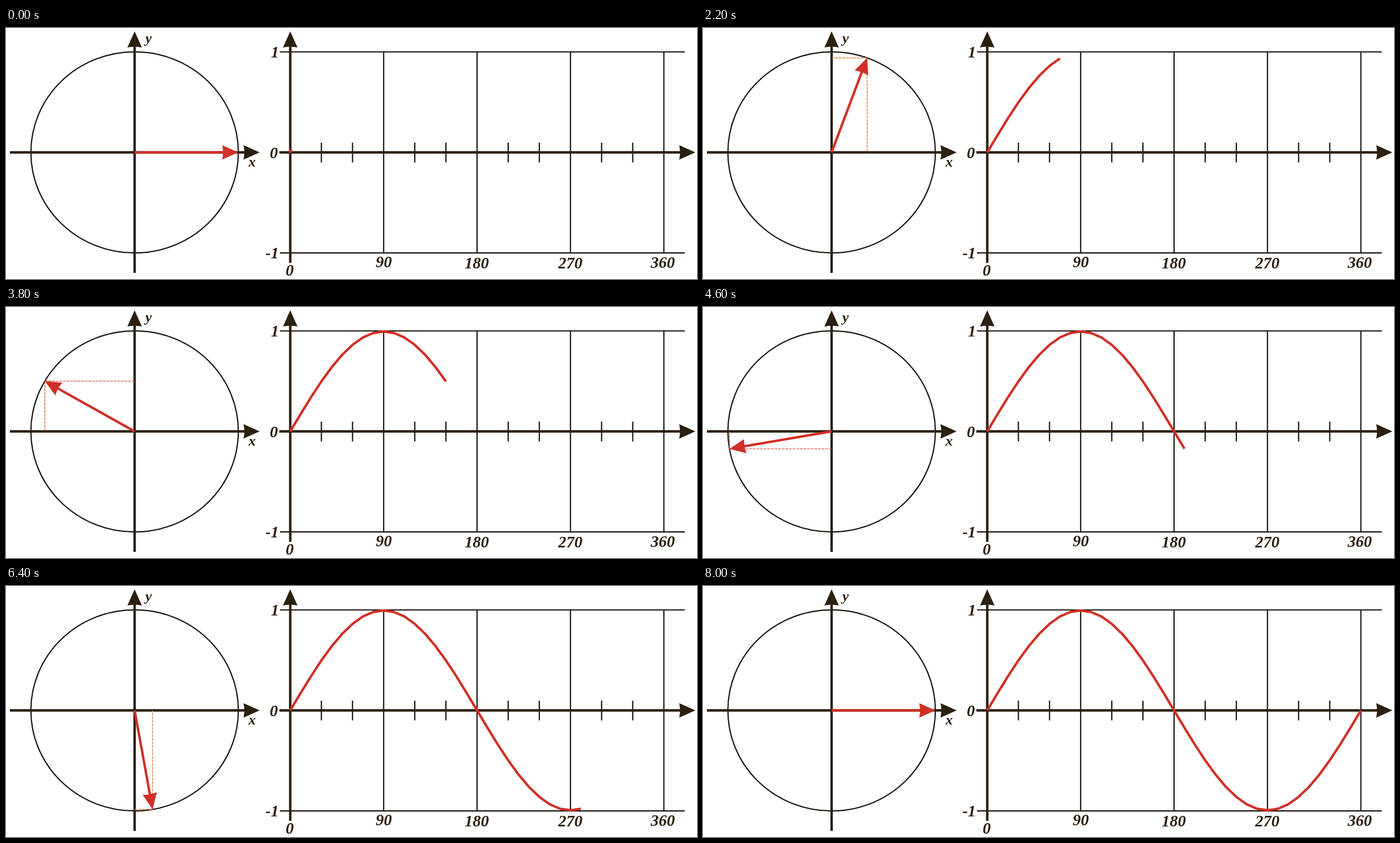
These frames come from a looping animation (1241x451 px, 9200 ms). An HTML page:

```html
<!DOCTYPE html>
<html lang="en">
<head>
<meta charset="utf-8">
<title>Sine from the unit circle</title>
<style>
  html, body { margin: 0; width: 100%; height: 100%; overflow: hidden; background: #fff; }
  svg { display: block; width: 1241px; height: 451px; }
  .axis { stroke: #2b1f0d; stroke-width: 4.4; }
  .thin { stroke: #17110c; stroke-width: 2.2; fill: none; }
  .head { fill: #2b1f0d; }
  .red { stroke: #d03028; stroke-width: 4.4; fill: none; stroke-linejoin: round; }
  .redHead { fill: #d03028; }
  .guide { stroke-width: 1.4; stroke-dasharray: 5 1.5; fill: none; }
  text { font: italic bold 29px "Liberation Serif", "Times New Roman", serif; fill: #2b1f0d; text-anchor: middle; }
  .name { font-size: 26px; }
</style>
</head>
<body>
<svg viewBox="0 0 1241 451">
  <defs>
    <path id="tip" d="M0 0L-29 -13Q-26 0 -29 13Z"/>
  </defs>

  <ellipse class="thin" cx="231" cy="223.5" rx="186.3" ry="180.7"/>
  <path class="thin" d="M492 43H1219M492 404.2H1219"/>
  <path class="thin" id="grid"/>

  <path class="axis" d="M7 223.5H430M231 440V30M491 223.5H1212M510.5 422V30"/>
  <g class="head">
    <use href="#tip" transform="translate(455.5 223.5)"/>
    <use href="#tip" transform="translate(1238 223.5)"/>
    <use href="#tip" transform="translate(231 6) rotate(-90)"/>
    <use href="#tip" transform="translate(510.5 6) rotate(-90)"/>
  </g>

  <text class="name" x="256" y="27">y</text>
  <text class="name" x="442" y="249">x</text>
  <text x="483" y="53">1</text>
  <text x="481" y="234">0</text>
  <text x="478" y="414">-1</text>
  <text x="509.5" y="445">0</text>
  <text x="678.5" y="430">90</text>
  <text x="845.5" y="432">180</text>
  <text x="1013.5" y="432">270</text>
  <text x="1179.5" y="431">360</text>

  <path class="guide" id="guide"/>
  <path class="red" id="shaft"/>
  <use class="redHead" id="head" href="#tip"/>
  <path class="red" id="curve"/>
  <rect class="redHead" id="dot" x="508" y="218" width="6" height="6"/>
</svg>
<script>
  const LOOP = 9200, HOLD = 1000, STEP = 200, STEPS = 36;
  const CX = 231, CY = 223.5, RX = 186.3, RY = 180.7;
  const X0 = 510.5, SPAN = 671, WAVE = 179.5;
  const $ = id => document.getElementById(id);
  const rad = step => step * 2 * Math.PI / STEPS;

  // Full-height line every 90 degrees, short tick every 30.
  let grid = "";
  for (let i = 1; i <= 12; i++) {
    grid += `M${X0 + SPAN * i / 12} ` + (i % 3 ? "206V241.5" : "43V404");
  }
  $("grid").setAttribute("d", grid);

  function draw(step) {
    const a = rad(step);
    const dx = RX * Math.cos(a), dy = -RY * Math.sin(a);
    const len = Math.hypot(dx, dy), inner = (len - 25) / len;
    const x = CX + dx, y = CY + dy;

    $("shaft").setAttribute("d", `M${CX} ${CY}L${CX + dx * inner} ${CY + dy * inner}`);
    $("head").setAttribute("transform",
      `translate(${x} ${y}) rotate(${Math.atan2(dy, dx) * 180 / Math.PI})`);

    const idle = step % STEPS === 0;
    $("guide").setAttribute("d", idle ? "" : `M${CX} ${y}H${x}M${x} ${y}V${CY}`);
    $("guide").setAttribute("stroke", dx > 1 ? "#dc7a35" : "#d9543f");

    let d = `M${X0} ${CY}`;
    for (let i = 1; i <= step; i++) {
      d += `L${X0 + SPAN * i / STEPS} ${CY - WAVE * Math.sin(rad(i))}`;
    }
    $("curve").setAttribute("d", d);
    $("dot").style.display = step ? "none" : "";
  }

  const start = performance.now();
  let shown = -1;
  function frame() {
    const t = (performance.now() - start) % LOOP;
    const step = Math.min(STEPS, Math.max(0, Math.floor((t - HOLD) / STEP) + 1));
    if (step !== shown) draw(shown = step);
    requestAnimationFrame(frame);
  }
  frame();
</script>
</body>
</html>
```
